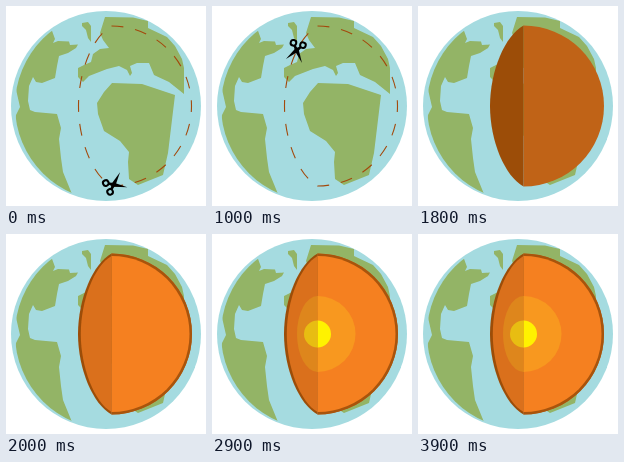
Recreate the animation shown at these times as an HTML page. Size 200 by 200 pixels, loop 4.4 s.

```html
<!DOCTYPE html>
<html lang="en">
<head>
<meta charset="utf-8">
<title>Cutting the globe open</title>
<style>
html, body { margin: 0; width: 100%; height: 100%; overflow: hidden; background: #fff; }
svg { display: block; width: 100vw; height: 100vh; }
.land { fill: #93b466; }
.line { fill: none; stroke: #a3490c; stroke-width: 1.1; }
[data-from] { visibility: hidden; }
</style>
</head>
<body>
<svg viewBox="0 0 200 200">
  <defs>
    <clipPath id="disc"><circle cx="104" cy="100" r="95"/></clipPath>
    <path id="cut" d="M105.500 20A80 80 0 0 1 105.500 180C87 170 72.500 135 72.500 100S87 30 105.500 20Z" pathLength="432"/>
  </defs>

  <circle cx="100" cy="100" r="95" fill="#a5dbe0"/>
  <g class="land" clip-path="url(#disc)">
    <path d="M45 22L49 33L47 37L52 35L63 35.500L64 39L72 38.500L70 42L62 47L53 50L51 60L49 72L36 77L30 76L27 71L23 80L22 95L24 104L29 106L51 108L55 122L53 133L55 152L57 166L66 188L0 190L8 123L10 109L14 101L9 79L0 60L15 20Z"/>
    <path d="M76 17L82 16L85 20L85 36L82 32L80 24L76 20Z"/>
    <path d="M99 11L127 11.500L142 15L142 22L161 31L169 40L176 53L178 62L178 88L163 76L148 69L143 57L131 57L124 60L126 67L124 70L121 64L113 60L101 63L83 70L77 76L72 71L72 62L78 59L85 56L87 48L94 43L103 42L97 34L94 27Z"/>
    <path d="M106 77L136 78L148 82L169 89L162 147L157 169L132 179L123 173L122 156L123 146L114 135L98 125L92 108L91 97L98 86Z"/>
  </g>

  <use href="#cut" class="line" stroke-dasharray="12 12" data-from="0" data-to="1600"/>
  <use href="#cut" class="line" data-from="1600" data-to="1800"/>

  <g data-from="1800" data-to="4400">
    <path fill="#c06317" d="M105.500 19.500A80.500 80.500 0 0 1 105.500 180.500Z"/>
    <path fill="#9c4d08" d="M105.500 19.500C87 29.500 72 65 72 100S87 170.500 105.500 180.500Z"/>
  </g>
  <g data-from="2000" data-to="4400">
    <path fill="#a8540c" d="M105.500 19.500A80.500 80.500 0 0 1 105.500 180.500Z"/>
    <path fill="#f58020" d="M105.500 22A78 78 0 0 1 105.500 178Z"/>
    <path fill="#da701c" d="M105.500 22C88 32 74.800 67 74.800 100S88 168 105.500 178Z"/>
  </g>
  <g data-from="2200" data-to="4400">
    <path fill="#f8981f" d="M105.500 62A38 38 0 0 1 105.500 138Z"/>
    <path fill="#de861c" d="M105.500 62A20.500 38 0 0 0 105.500 138Z"/>
  </g>
  <g data-from="2400" data-to="4400">
    <path id="core" d="M105.500 86.500A13.500 13.500 0 0 1 105.500 113.500Z"/>
    <path fill="#e8bd12" d="M105.500 86.500A13.500 13.500 0 0 0 105.500 113.500Z"/>
  </g>

  <g id="scissors" data-from="0" data-to="1600">
    <g id="blade">
      <circle cx="-6.200" cy="-4.900" r="2.800" fill="none" stroke="#000" stroke-width="2"/>
      <path d="M-4.600 -2.600L-3 -4L2 -.9L11.300 8.300L-.8 1.900Z"/>
    </g>
    <use href="#blade" transform="scale(1 -1)"/>
  </g>
</svg>
<script>
const LOOP = 4400, STEP = 200;

// x, y, heading in degrees for each snip
const poses = [
  [107.5, 178.7, -26], [150.5, 166.5, -45], [182, 120, -75], [174, 56, -118],
  [107, 20, -182], [84.7, 44, -256], [72, 102, -263], [94, 168.5, -305]
];

const parts = [...document.querySelectorAll('[data-from]')];
const scissors = document.getElementById('scissors');
const core = document.getElementById('core');

function draw(t) {
  for (const el of parts) {
    const on = t >= +el.dataset.from && t < +el.dataset.to;
    el.style.visibility = on ? 'visible' : 'hidden';
  }
  const [x, y, turn] = poses[Math.min(Math.floor(t / STEP), poses.length - 1)];
  scissors.setAttribute('transform', `translate(${x} ${y}) rotate(${turn})`);

  // the inner core glows every other half second
  const glow = Math.floor((t - 2400) / 500) % 2;
  core.setAttribute('fill', glow ? '#fff200' : '#ffd014');
}

const start = performance.now();
function tick() {
  draw((performance.now() - start) % LOOP);
  requestAnimationFrame(tick);
}
tick();
</script>
</body>
</html>
```
